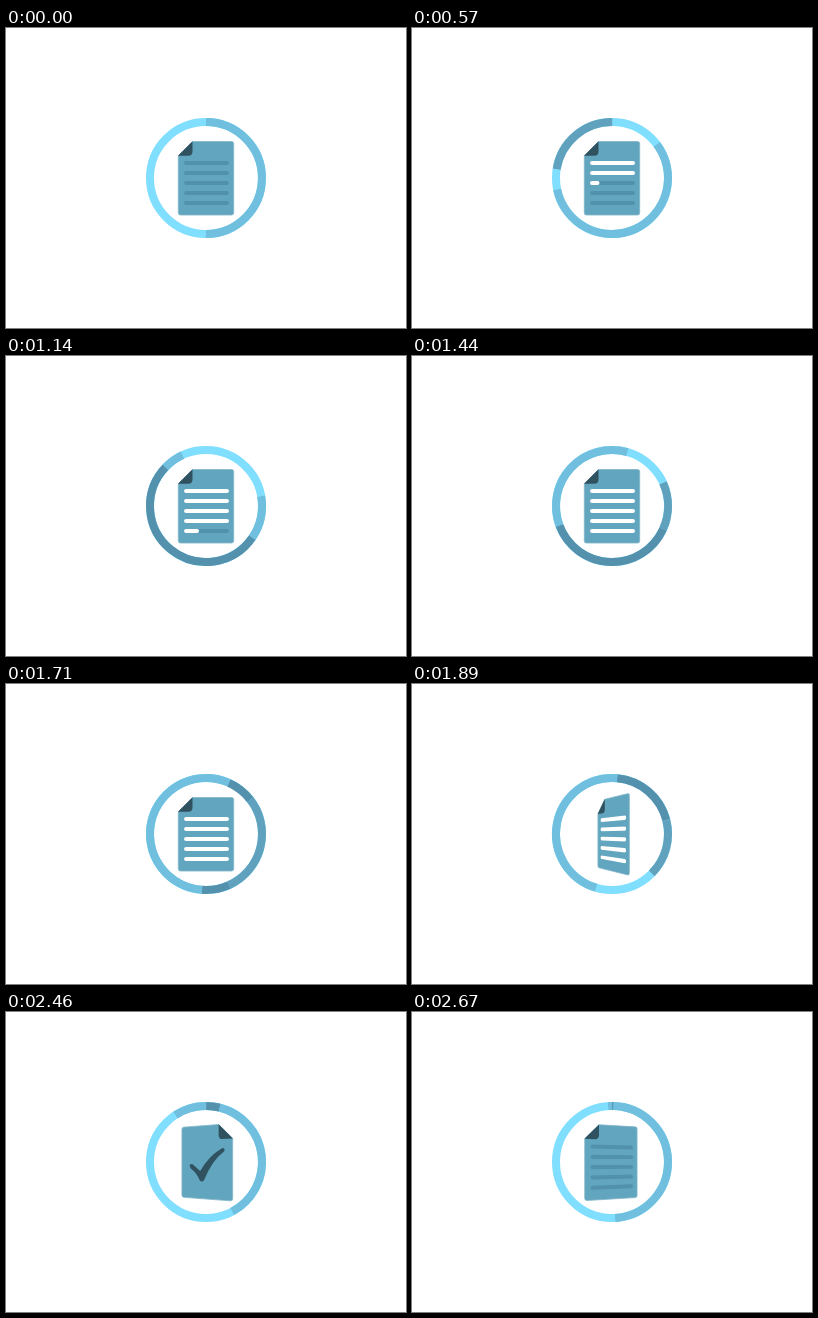
Write an HTML page that moves like this. It is 400 px wide and 300 px high and loops after 2700 ms.

```html
<!DOCTYPE html>
<html lang="en">
<head>
<meta charset="utf-8">
<title>Document progress</title>
<style>
html, body { margin: 0; width: 100%; height: 100%; overflow: hidden; background: #fff; }
svg { display: block; width: 100%; height: 100%; }
</style>
</head>
<body>
<svg id="stage" viewBox="0 0 400 300"></svg>
<script>
const LOOP = 2700, STEP = 30;
const CX = 200, CY = 150, RADIUS = 56, DEPTH = 220;
const RING = ['#80deff', '#70bfdf', '#60a2bd', '#5391ad'];
const PAGE = '#61a5be', EDGE = '#80b5c8', FOLD = '#305260', INK = '#5291ab';
const LINE_MS = 267;

// Edges of the two arcs: [time, angle], clockwise from the top.
const thinStart = [[0, 0], [570, 53], [1140, 80], [1710, 156], [2040, 234], [2460, 327], [2700, 360]];
const thinEnd = [[0, 180], [570, 258], [1140, 335], [1710, 412], [2040, 455], [2460, 512], [2700, 540]];
const deepStart = [[0, 360], [570, 279], [1140, 124.5], [1710, 24], [2040, 0], [2700, 0]];
const deepEnd = [[0, 360], [750, 360], [1140, 313.6], [1710, 184], [2040, 95], [2460, 14], [2700, 0]];

const SHEET = 'M186.5 113.5 L225.5 113.5 Q227.7 113.5 227.7 115.7 L227.7 184.8 Q227.7 187 225.5 187 L174.5 187 Q172.3 187 172.3 184.8 L172.3 127.7 Z';
const CORNER = 'M186.5 113.3 L186.5 123.6 Q186.5 127.8 182.3 127.8 L172 127.8 Z';
const TICK = 'M181.3 153.8 Q182.5 151 186 153 L193.5 159 Q203 144 216.5 136.8 Q220 135.8 219.5 139.4 Q206 149 198 168 Q195.5 171 193 168.5 Q189.5 161 182.8 156.8 Z';

const stage = document.getElementById('stage');
function add(attrs) {
  const el = document.createElementNS('http://www.w3.org/2000/svg', 'path');
  for (const k in attrs) el.setAttribute(k, attrs[k]);
  return stage.appendChild(el);
}
const clamp = v => Math.max(0, Math.min(1, v));

// Smooth curve through the keys, flat where they are flat.
function curve(keys, t) {
  let i = 0;
  while (i < keys.length - 2 && t > keys[i + 1][0]) i++;
  const sec = j => (keys[j + 1][1] - keys[j][1]) / (keys[j + 1][0] - keys[j][0]);
  const slope = j => {
    if (j === 0) return sec(0);
    if (j === keys.length - 1) return sec(j - 1);
    if (sec(j - 1) * sec(j) <= 0) return 0;
    return (keys[j + 1][1] - keys[j - 1][1]) / (keys[j + 1][0] - keys[j - 1][0]);
  };
  const [t0, a] = keys[i], [t1, b] = keys[i + 1];
  const h = t1 - t0, u = clamp((t - t0) / h), v = 1 - u;
  return a * (1 + 2 * u) * v * v + b * u * u * (3 - 2 * u) + h * u * v * (v * slope(i) - u * slope(i + 1));
}

const mod = a => ((a % 360) + 360) % 360;
const within = (a, s, e) => mod(a - s) < e - s;

function arc(s, e) {
  const at = a => {
    const r = a * Math.PI / 180;
    return (CX + RADIUS * Math.sin(r)).toFixed(2) + ' ' + (CY - RADIUS * Math.cos(r)).toFixed(2);
  };
  return `M${at(s)}A${RADIUS} ${RADIUS} 0 ${e - s > 180 ? 1 : 0} 1 ${at(e)}`;
}

add({ d: arc(0, 180) + arc(180, 360), fill: 'none', stroke: RING[0], 'stroke-width': 8 });
const segments = Array.from({ length: 5 }, () => add({ fill: 'none', 'stroke-width': 8 }));

function drawRing(t) {
  const xs = curve(thinStart, t), xe = curve(thinEnd, t);
  const ys = curve(deepStart, t), ye = curve(deepEnd, t);
  const cuts = [xs, xe, ys, ye].map(mod).sort((a, b) => a - b);
  segments.forEach((el, i) => {
    const s = cuts[i], e = i < 3 ? cuts[i + 1] : cuts[0] + 360;
    if (i > 3 || e - s < 0.05) return el.setAttribute('d', '');
    const m = (s + e) / 2;
    const tone = (within(m, xs, xe) ? 1 : 0) + (within(m, ys, ye) ? 2 : 0);
    el.setAttribute('stroke', RING[tone]);
    el.setAttribute('d', tone ? arc(s, Math.min(e + 0.2, s + 359.9)) : '');
  });
}

const sheet = add({ fill: PAGE, stroke: EDGE, 'stroke-width': 0.8 });
const corner = add({ fill: FOLD });
const lines = add({ fill: INK });
const done = add({ fill: '#fff' });
const tick = add({ fill: FOLD });

function bar(row, share) {
  const y = 133 + row * 10, x = 178, r = x + 4 + 41 * share, b = y + 4;
  return `M${x + 2} ${y} L${r - 2} ${y} Q${r} ${y} ${r} ${y + 2} Q${r} ${b} ${r - 2} ${b} ` +
    `L${x + 2} ${b} Q${x} ${b} ${x} ${y + 2} Q${x} ${y} ${x + 2} ${y} Z `;
}

// Turns a flat path around the vertical axis, with perspective.
function turn(path, angle, flip) {
  const c = Math.cos(angle), s = Math.sin(angle);
  return path.replace(/([\d.]+) ([\d.]+)/g, (_, px, py) => {
    const x = (px - CX) * (flip ? -1 : 1);
    const k = 1 / (1 - x * s / DEPTH);
    return (CX + x * c * k).toFixed(2) + ' ' + (CY + (py - CY) * k).toFixed(2);
  });
}

function drawPage(t) {
  const angle = Math.PI * (clamp((t - 1804) / 277) + clamp((t - 2423) / 277));
  const back = Math.cos(angle) < 0;
  const put = (el, path, flip) => el.setAttribute('d', path && turn(path, angle, flip));
  let ink = '', white = '';
  if (!back) {
    for (let i = 0; i < 5; i++) {
      ink += bar(i, 1);
      const share = clamp(t / LINE_MS - i);
      if (t < 2250 && share > 0) white += bar(i, share);
    }
  }
  put(sheet, SHEET);
  put(corner, CORNER);
  put(lines, ink);
  put(done, white);
  put(tick, back ? TICK : '', true);
}

function frame(now) {
  const t = Math.floor((now % LOOP) / STEP) * STEP;
  drawRing(t);
  drawPage(t);
}

let begin = null;
function loop(now) {
  if (begin === null) begin = now;
  frame(Math.max(0, now - begin));
  requestAnimationFrame(loop);
}
frame(0);
requestAnimationFrame(loop);
</script>
</body>
</html>
```
